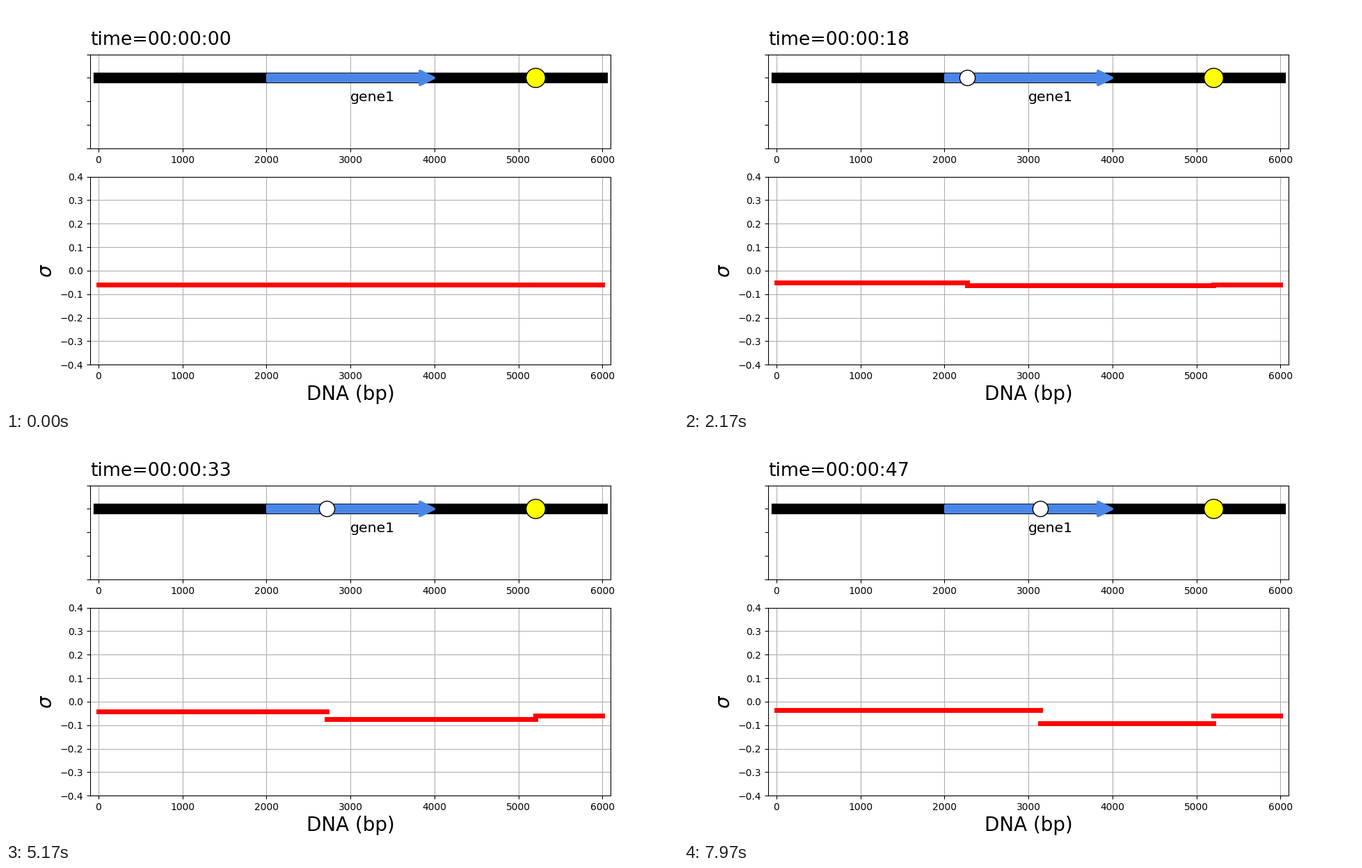
Write a matplotlib script that moves like this. It is 966 by 580 pixels and loops after 8 s.

```python
import matplotlib.pyplot as plt
import numpy as np
from matplotlib.animation import FuncAnimation

LOOP_MS, INTERVAL_MS = 8000, 20
DNA_LENGTH, BARRIER = 6000, 5200
GENE_START, GENE_END = 2000, 4000
BIND_TIME, SPEED = 9.5, 30      # seconds, base pairs per second
SIGMA_REST = -0.06
TRACK_Y = 3

plt.rcParams["font.family"] = "DejaVu Sans"

fig, (track, plot) = plt.subplots(
    2, 1, figsize=(9.66, 5.8), dpi=100,
    gridspec_kw=dict(height_ratios=[1, 2]))
fig.subplots_adjust(left=0.125, right=0.9, bottom=0.11, top=0.88, hspace=0.2)

for ax in (track, plot):
    ax.set_xlim(-100, DNA_LENGTH + 100)
    ax.set_xticks(range(0, DNA_LENGTH + 1, 1000))
track.set_ylim(0, 4)
track.set_yticks(range(5), labels=[""] * 5)
track.grid(axis="x")
plot.set_ylim(-0.4, 0.4)
plot.set_yticks(np.linspace(-0.4, 0.4, 9))
plot.grid()
plot.set_xlabel("DNA (bp)", fontsize=20)
plot.set_ylabel(r"$\sigma$", fontsize=20)


def disc(x, size, color):
    return track.plot([x], [TRACK_Y], "o", ms=size, mfc=color, mec="black",
                      mew=1, zorder=5)[0]


def gene_arrow(start, end, color):
    body, head, neck = 0.139, 0.295, end - 172
    xs = np.array([start + 13, neck, neck, end - 7, neck, neck, start + 13])
    ys = TRACK_Y + np.array([body, body, head, 0, -head, -body, -body])
    return track.fill(xs, ys, fc=color, ec=color, lw=2.9,
                      joinstyle="round", zorder=4)[0]


static = [
    track.plot([0, DNA_LENGTH], [TRACK_Y] * 2, color="black", lw=11)[0],
    gene_arrow(GENE_START, GENE_END, "#4a86e8"),
    track.text((GENE_START + GENE_END) / 2, 2, "gene1", fontsize=14.7),
    disc(BARRIER, 20, "yellow"),
]

# Keep the unchanging part as one image so that each frame is quick to draw.
fig.canvas.draw()
backdrop = np.array(fig.canvas.buffer_rgba())
for artist in static:
    artist.set_visible(False)
for ax in (track, plot):
    ax.set_axis_off()
fig.figimage(backdrop, zorder=-1)

clock = fig.text(0.125, 1 - 56 / 580, "", fontsize=19.3)
polymerase = disc(GENE_START, 16, "white")
upstream, downstream, beyond = (
    plot.plot([], [], color="red", lw=5)[0] for _ in range(3))


def simulated_time(ms):
    """Whole seconds every 30 ms at first, then half seconds every 100 ms."""
    return ms // 30 if ms < 270 else 9 + 0.5 * ((ms - 270) // 100)


def set_level(line, start, end, sigma):
    line.set_data([start, end], [sigma, sigma])


def update(frame):
    t = simulated_time(frame * INTERVAL_MS + INTERVAL_MS // 2)
    clock.set_text(f"time=00:00:{int(t):02d}")

    bound = t >= 9
    polymerase.set_visible(bound)
    upstream.set_visible(bound)
    set_level(beyond, BARRIER, DNA_LENGTH, SIGMA_REST)
    if bound:
        x = GENE_START + SPEED * max(0, t - BIND_TIME)
        polymerase.set_data([x], [TRACK_Y])
        # The twist of each domain is nearly conserved as its length changes.
        set_level(upstream, 0, x, (0.0011 * x - 115.4) / x)
        set_level(downstream, x, BARRIER, -186.65 / (BARRIER - x))
    else:
        set_level(downstream, 0, BARRIER, SIGMA_REST)
    return clock, polymerase, upstream, downstream, beyond


animation = FuncAnimation(fig, update, frames=LOOP_MS // INTERVAL_MS,
                          interval=INTERVAL_MS, repeat=True, repeat_delay=0)
plt.show()
```
